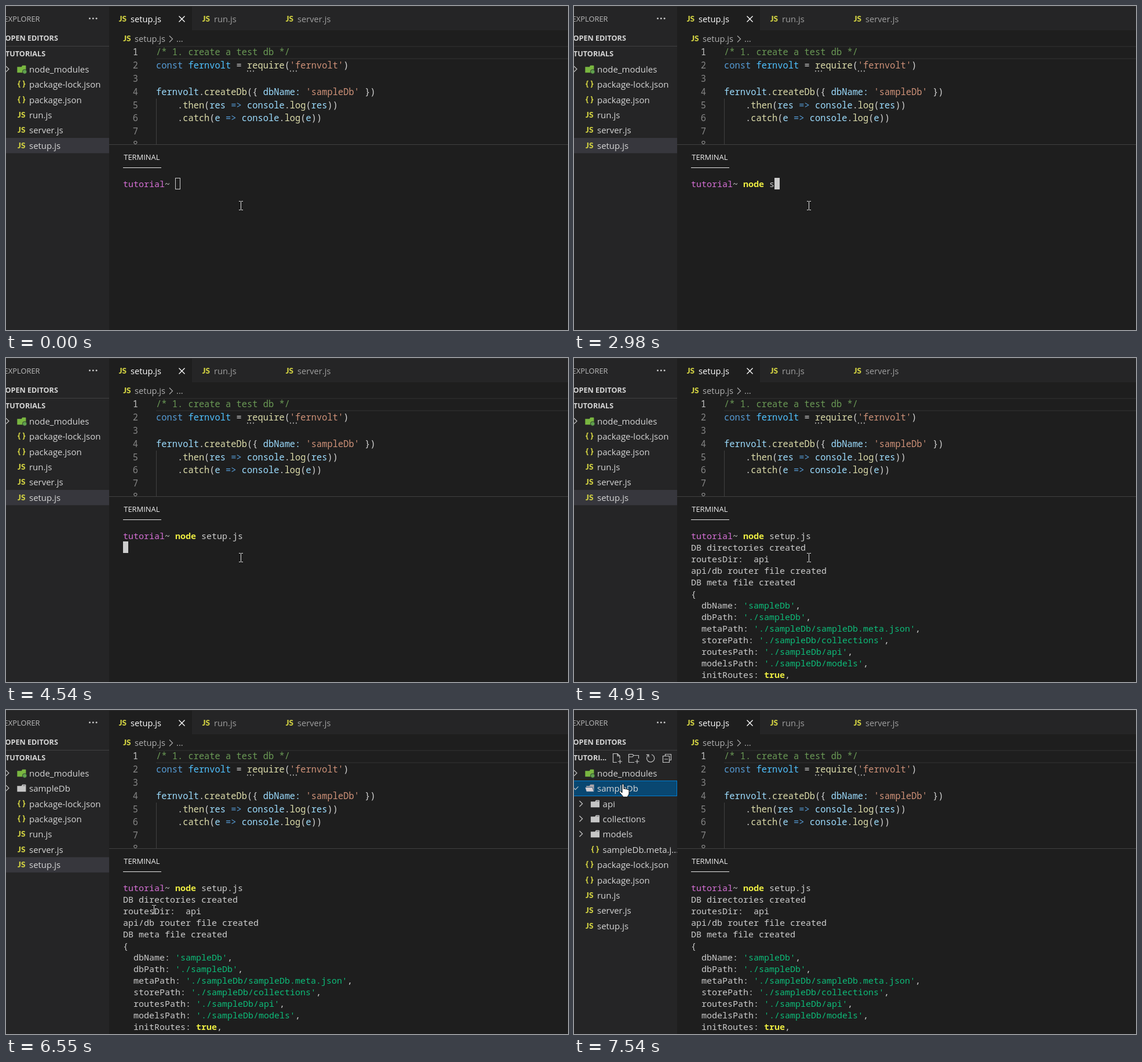
An HTML page that plays this animation: 970 px wide and 560 px high, repeating every 8000 ms.

```html
<!DOCTYPE html>
<html lang="en">
<head>
<meta charset="utf-8">
<title>Editor and terminal</title>
<style>
html, body { margin: 0; width: 100%; height: 100%; overflow: hidden; background: #1e1e1e; }
svg { display: block; width: 970px; height: 560px; }
text { white-space: pre; font: 15px "Open Sans", "Noto Sans", sans-serif; fill: #d6d6d6; }
#tabs text { font-size: 14.7px; }
.code text { font: 15.4px "Noto Sans Mono", "DejaVu Sans Mono", monospace; fill: #d4d4d4; }
.term text { font: 15px "Noto Sans Mono", "DejaVu Sans Mono", monospace; fill: #ccc; }
text.head { font-size: 12.6px; font-weight: 700; }
text.cap { font-size: 12.9px; }
text.js { font: 900 13.5px Lato, "Open Sans", sans-serif; fill: #cbcb41; }
.code .num { fill: #858585; }
.cm { fill: #6a9955; } .kw { fill: #569cd6; } .cn { fill: #4fc1ff; }
.fn { fill: #dcdcaa; } .st { fill: #ce9178; } .vr { fill: #9cdcfe; }
.mg { fill: #d670d6; } .gr { fill: #0dbc79; } .yl { fill: #ecec42; font-weight: 700; }
.line { fill: none; stroke: #c5c5c5; stroke-width: 1.2; }
</style>
</head>
<body>
<svg viewBox="0 0 970 560">
  <defs>
    <clipPath id="pane"><rect x="178" y="42" width="792" height="197"/></clipPath>
    <clipPath id="side"><rect width="178" height="560"/></clipPath>
    <!-- icons are centred on the origin -->
    <text id="js" class="js" x="-6.8" y="5">JS</text>
    <path id="json" d="M-2.2-5.4C-4.6-5.4-4.2-3.8-4.2-2.4S-4.8 0-6.4 0C-4.8 0-4.2 1-4.2 2.4S-4.6 5.4-2.2 5.4M2.2-5.4C4.6-5.4 4.2-3.8 4.2-2.4S4.8 0 6.4 0C4.8 0 4.2 1 4.2 2.4S4.6 5.4 2.2 5.4" fill="none" stroke="#cbcb41" stroke-width="1.8"/>
    <path id="shape" d="M-7.5-3.8H0L1.4-6.3H6.6Q7.6-6.3 7.6-5.3V6.3H-7.5Z"/>
    <g id="folder" fill="#c5c5c5"><use href="#shape"/><path d="M2-3.8L2.6-5H6.4V-3.8Z" fill="#77777a"/></g>
    <g id="modules">
      <use href="#shape" fill="#79b640"/>
      <circle cx="5.4" cy="4.6" r="3.8" fill="#5fa04e" stroke="#252526" stroke-width=".8"/>
    </g>
    <g id="opened">
      <path d="M-5.6 5V-3.8H0L1.4-6.3H7.8V6H5Z" fill="#a9a3a8"/>
      <path d="M-7.8-1.4H5L7.8 6.2H-5.4Z" fill="#d8cfd2" stroke="#094771" stroke-width=".8"/>
    </g>
    <path id="right" class="line" d="M-2.6-5L2.6 0L-2.6 5"/>
    <path id="down" class="line" d="M-5-2.6L0 2.6L5-2.6"/>
  </defs>

  <rect width="970" height="560" fill="#1e1e1e"/>
  <rect x="178" width="792" height="42" fill="#252526"/>
  <rect x="178" width="143" height="43" fill="#1e1e1e"/>

  <g id="tabs">
    <use href="#js" x="201.5" y="22"/><text x="215" y="28" style="fill:#fff">setup.js</text>
    <path d="M298.5 17.5L308.5 27.5M308.5 17.5L298.5 27.5" stroke="#fff" stroke-width="1.4"/>
    <use href="#js" x="345.5" y="22"/><text x="359" y="28" style="fill:#a0a0a0">run.js</text>
    <use href="#js" x="489.5" y="22"/><text x="503" y="28" style="fill:#a0a0a0">server.js</text>
    <use href="#js" x="209" y="56"/><text x="222" y="62" style="fill:#b0b0b0">setup.js</text>
    <path class="line" d="M282 51.5L287.5 57L282 62.5" style="stroke:#a9a9a9"/>
    <text x="294" y="62" style="fill:#b0b0b0">...</text>
  </g>

  <g class="code" clip-path="url(#pane)">
    <path d="M259 70H970M259 91H970" stroke="#282828" stroke-width="2"/>
    <rect x="259" y="160" width="1" height="80" fill="#404040"/>
    <g id="nums"></g>
    <text x="259" y="85"><tspan class="cm">/* 1. create a test db */</tspan></text>
    <text x="259" y="108"><tspan class="kw">const</tspan> <tspan class="cn">fernvolt</tspan> = <tspan class="fn">require</tspan>(<tspan class="st">'fernvolt'</tspan>)</text>
    <text x="259" y="154"><tspan class="vr">fernvolt</tspan>.<tspan class="fn">createDb</tspan>({ <tspan class="vr">dbName:</tspan> <tspan class="st">'sampleDb'</tspan> })</text>
    <text x="259" y="177">    .<tspan class="fn">then</tspan>(<tspan class="vr">res</tspan> <tspan class="kw">=&gt;</tspan> <tspan class="vr">console</tspan>.<tspan class="fn">log</tspan>(<tspan class="vr">res</tspan>))</text>
    <text x="259" y="199">    .<tspan class="fn">catch</tspan>(<tspan class="vr">e</tspan> <tspan class="kw">=&gt;</tspan> <tspan class="vr">console</tspan>.<tspan class="fn">log</tspan>(<tspan class="vr">e</tspan>))</text>
    <path d="M416 112.5H429M490 112.5H503" stroke="#a0a0a0" stroke-width="2" stroke-dasharray="2 3"/>
    <rect id="caret" x="490" y="69" width="2" height="23" fill="#aeafad"/>
  </g>

  <rect x="178" y="239" width="792" height="1" fill="#414141"/>
  <text class="cap" x="203.3" y="266" style="fill:#f0f0f0">TERMINAL</text>
  <rect x="202" y="279" width="66" height="1" fill="#e7e7e7"/>

  <g class="term">
    <text x="202" y="313"><tspan class="mg">tutorial</tspan>~ <tspan id="cmd" class="yl"></tspan><tspan id="arg"></tspan></text>
    <g id="out"></g>
    <rect id="block" width="9" height="20" fill="#ccc"/>
    <rect id="hollow" x="292.5" y="297.5" width="8" height="19" fill="none" stroke="#ccc"/>
  </g>

  <g clip-path="url(#side)">
    <rect width="178" height="560" fill="#252526"/>
    <text class="cap" x="-3.4" y="27" style="fill:#bbb">EXPLORER</text>
    <g fill="#c5c5c5"><circle cx="144.5" cy="21.5" r="1.5"/><circle cx="150.3" cy="21.5" r="1.5"/><circle cx="156.1" cy="21.5" r="1.5"/></g>
    <text class="head" x="-1.5" y="60">OPEN EDITORS</text>
    <rect y="69" width="178" height="1" fill="#424243"/>
    <text class="head" id="title" x="-1" y="87"></text>
    <g id="tools" class="line">
      <path d="M74 90.5H67.5V75.5H75L79 79.5V84M75 75.5V79.5H79M79.5 85.5V92.5M76 89H83"/>
      <path d="M104 90.5H94.5V76.5H101L103 78.5H111.5V84M94.5 81H101L103 78.5M109 85.5V92.5M105.5 89H112.5"/>
      <path d="M128 78.2A6.6 6.6 0 1 0 134 77M124.8 77.3H129V81.8"/>
      <path d="M157.5 79V76.5H167.5V86.5H165M153.5 79.5H164.5V90.5H153.5ZM156 85H162"/>
    </g>
    <rect id="hover" width="178" height="26.4" fill="#2a2d2e"/>
    <rect id="sel" width="178" height="26.4" fill="#37373d"/>
    <rect id="focus" x="-.5" y="122.5" width="178" height="26" fill="#094771" stroke="#007fd4"/>
    <g id="trees"></g>
  </g>

  <rect width="970" height="1" fill="#303031"/>
  <path id="beam" d="M-3.5-7.5H-1L0-6.8L1-7.5H3.5M0-6.8V6.8M-3.5 7.5H-1L0 6.8L1 7.5H3.5" fill="none" stroke="#e4e4e4"/>
  <path id="hand" d="M-1 1.5C-1-.6 2-.6 2 1.5V8.5C2.5 7.5 5 7.5 5 9C5.8 8 8 8.4 8 9.8C9 9 11 9.5 11 11V16C11 19 9 19 8.5 22.3H.5C.5 20-4.5 16.5-5.5 13.5C-5.8 11.9-4 11.5-2.8 13L-1 15Z" fill="#fff" stroke="#000"/>
</svg>

<script>
const $ = id => document.getElementById(id);
const show = (id, on) => { $(id).style.display = on ? '' : 'none'; };
const LOOP = 8000, ROW = 26.4, TOP = 96;

$('nums').innerHTML = [...Array(8).keys()].map(i =>
  `<text class="num" x="218.8" y="${Math.ceil(84.9 + 22.8 * i)}"${i ? '' : ' style="fill:#c6c6c6"'}>${i + 1}</text>`).join('');

// Terminal output: plain lines, then "key: value" pairs with a style
const output = [
  ['DB directories created'], ['routesDir:  api'], ['api/db router file created'],
  ['DB meta file created'], ['{'],
  ['  dbName: ', "'sampleDb'"], ['  dbPath: ', "'./sampleDb'"],
  ['  metaPath: ', "'./sampleDb/sampleDb.meta.json'"],
  ['  storePath: ', "'./sampleDb/collections'"], ['  routesPath: ', "'./sampleDb/api'"],
  ['  modelsPath: ', "'./sampleDb/models'"], ['  initRoutes: ', 'true', 'yl']
];
$('out').innerHTML = output.map(([key, val, cls = 'gr'], i) =>
  `<text x="202" y="${333 + 20 * i}">${key}${val ? `<tspan class="${cls}">${val}</tspan>,` : ''}</text>`).join('');

// File tree: [icon, label, arrow, depth]
const modules = ['modules', 'node_modules', 'right'];
const files = [['json', 'package-lock.json'], ['json', 'package.json'],
  ['js', 'run.js'], ['js', 'server.js'], ['js', 'setup.js']];
const inner = [['folder', 'api', 'right', 1], ['folder', 'collections', 'right', 1],
  ['folder', 'models', 'right', 1], ['json', 'sampleDb.meta.j...', '', 1]];
const trees = [
  [modules, ...files],
  [modules, ['folder', 'sampleDb', 'right'], ...files],
  [modules, ['opened', 'sampleDb', 'down'], ...inner, ...files]
];
const row = ([icon, label, arrow, depth = 0], i) => {
  const dx = depth * 9.6, y = Math.floor(TOP + ROW * i + 0.3);
  return (arrow ? `<use href="#${arrow}" x="${2.4 + dx}" y="${y + 13}"/>` : '') +
    `<use href="#${icon}" x="${26.8 + dx}" y="${y + 13}"/>` +
    `<text x="${40 + dx}" y="${y + 19}">${label}</text>`;
};
$('trees').innerHTML = trees.map((t, i) => `<g id="tree${i}">${t.map(row).join('')}</g>`).join('');

// Typing: [time, characters typed]
const command = 'node setup.js';
const keys = [[0, 0], [2240, 2], [2330, 3], [2610, 5], [2980, 6], [3070, 7], [3530, 8],
  [3620, 9], [3710, 10], [3990, 11], [4270, 12], [4360, 13]];
// Pointer: [time, x, y]
const moves = [[0, 405.5, 345], [5740, 407.5, 345], [5830, 409.5, 345],
  [6010, 432, 352], [6100, 496, 395], [6190, 574, 462], [6280, 608, 492],
  [6460, 470, 432], [6550, 255.5, 345], [6640, 158, 250], [6730, 122, 196], [6820, 102, 162],
  [6910, 93, 146], [7000, 88, 136], [7090, 85, 130], [7180, 84, 128]];
const latest = (list, t) => list.reduce((a, b) => b[0] <= t ? b : a);

function draw(t) {
  const n = latest(keys, t)[1];
  $('cmd').textContent = command.slice(0, Math.min(n, 4));
  $('arg').textContent = command.slice(4, Math.max(n, 4));

  const entered = t >= 4540;
  show('caret', t >= 190 && t < 370);
  show('hollow', t < 370);
  show('block', t >= 370 && t < 4910);
  $('block').setAttribute('x', entered ? 202 : 292 + 9 * n);
  $('block').setAttribute('y', entered ? 317 : 297);
  show('out', t >= 4910);

  const [, x, y] = latest(moves, t);
  const inside = x < 178, focused = t >= 7360;
  show('beam', !inside);
  show('hand', inside);
  $(inside ? 'hand' : 'beam').setAttribute('transform', `translate(${x} ${y})`);
  show('tools', inside);
  $('title').textContent = inside ? 'TUTORI...' : 'TUTORIALS';

  const state = t < 5560 ? 0 : t < 7450 ? 1 : 2;
  trees.forEach((_, i) => show('tree' + i, i === state));
  show('hover', inside && !focused);
  $('hover').setAttribute('y', TOP + ROW * Math.floor((y - TOP) / ROW));
  show('sel', !focused);
  $('sel').setAttribute('y', TOP + ROW * (state ? 6 : 5));
  show('focus', focused);
}

const start = performance.now();
function tick() {
  draw((performance.now() - start) % LOOP);
  requestAnimationFrame(tick);
}
tick();
</script>
</body>
</html>
```
